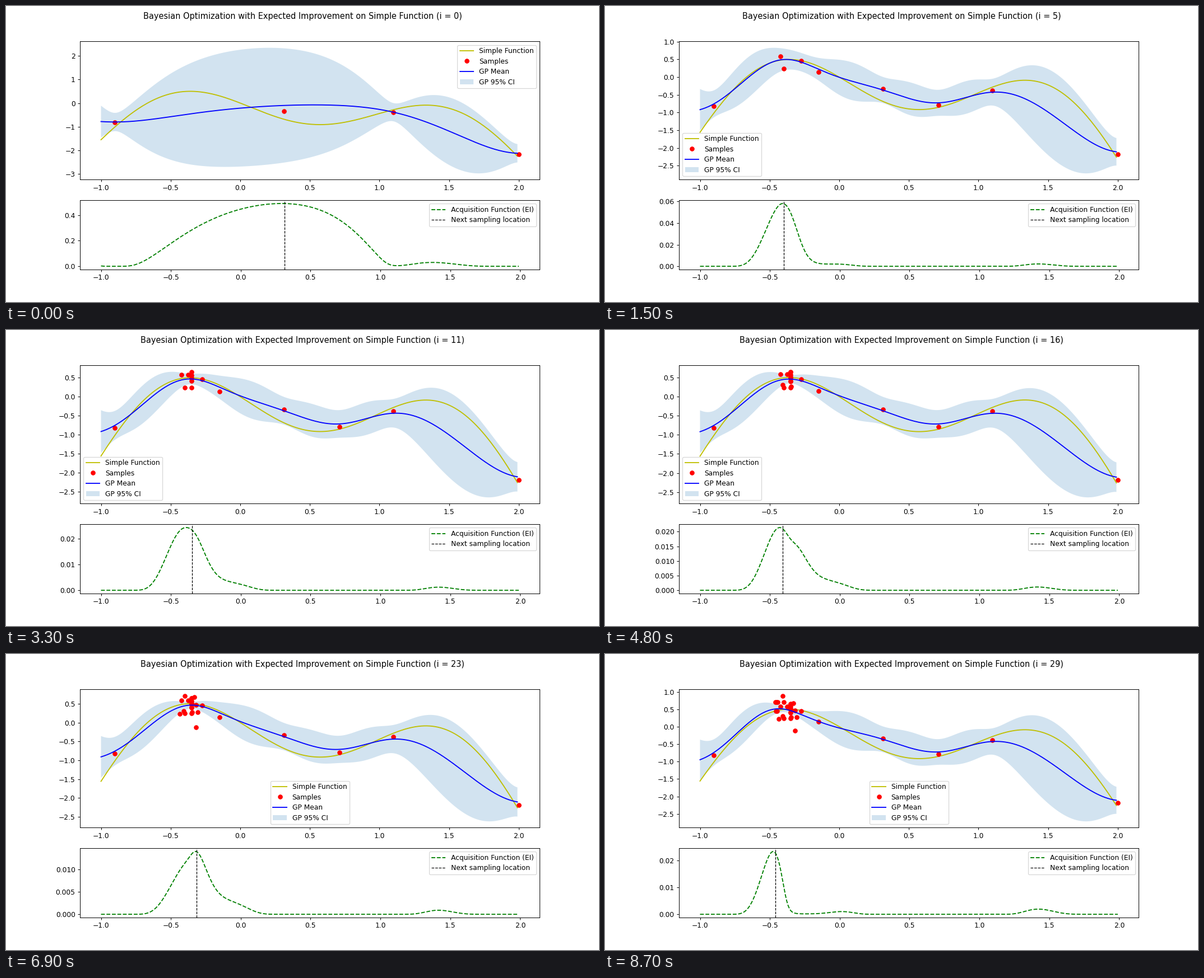
Write a matplotlib script that moves like this. It is 1058 px wide and 529 px high and loops after 9 s.

```python
import math

import matplotlib.pyplot as plt
import numpy as np
from matplotlib.animation import FuncAnimation

NOISE = 0.2
XI = 0.01
N_INIT = 3
N_STEPS = 30

x = np.arange(-1, 2, 0.01)
truth = -np.sin(3 * x) - x**2 + 0.7 * x
erf = np.vectorize(math.erf)


def run(x0, x1, ys):
    """Evenly spaced observations from x0 to x1."""
    return np.column_stack([np.linspace(x0, x1, len(ys)), ys])


def zigzag(y0, y1, n):
    """Noisy readings that alternate between two levels."""
    return np.resize([y0, y1], n)


def observations():
    """Three initial samples, a wide search, then a search around the peak."""
    initial = [(-0.9, -0.822), (1.1, -0.382), (2.0, -2.185)]
    explore = [(0.314, -0.334), (0.713, -0.787), (-0.149, 0.143), (-0.275, 0.455)]
    return np.vstack([
        initial,
        explore,
        run(-0.424, -0.351, zigzag(0.58, 0.24, 4)),
        run(-0.351, -0.349, np.linspace(0.65, 0.41, 4)),
        run(-0.351, -0.347, np.linspace(0.64, 0.27, 4)),
        [(-0.407, 0.305)],
        run(-0.330, -0.304, np.linspace(0.67, 0.27, 3)),
        run(-0.397, -0.433, zigzag(0.71, 0.23, 2)),
        [(-0.350, 0.50), (-0.317, -0.12), (-0.408, 0.885)],
        run(-0.443, -0.460, zigzag(0.70, 0.45, 5)),
    ])


def matern(a, b, length):
    """Matern 5/2 correlation."""
    r = math.sqrt(5) * np.abs(a[:, None] - b[None, :]) / length
    return (1 + r + r**2 / 3) * np.exp(-r)


def fit(xs, ys):
    """Maximise the marginal likelihood over length scale and variance."""
    log_len, log_var, span = 0.0, 0.0, 2.5
    steps = np.linspace(-1, 1, 15)
    for _ in range(6):
        lens = log_len + span * steps
        variances = log_var + span * steps
        corr = np.array([matern(xs, xs, math.exp(v)) for v in lens])
        w, q = np.linalg.eigh(corr)
        proj = np.einsum("lij,i->lj", q, ys) ** 2
        eig = np.exp(variances)[None, :, None] * w[:, None, :] + NOISE**2
        loss = (proj[:, None, :] / eig + np.log(eig)).sum(axis=2)
        a, b = np.unravel_index(loss.argmin(), loss.shape)
        log_len, log_var = lens[a], variances[b]
        span /= 5
    return math.exp(log_len), math.exp(log_var)


def make_predictor(xs, ys):
    length, var = fit(xs, ys)
    inv = np.linalg.inv(var * matern(xs, xs, length) + NOISE**2 * np.eye(len(xs)))

    def predict(points):
        k = var * matern(points, xs, length)
        spread = var - np.einsum("ij,jk,ik->i", k, inv, k)
        return k @ inv @ ys, np.sqrt(np.maximum(spread, 1e-12))

    return predict


def expected_improvement(mu, std, best):
    gain = mu - best - XI
    z = gain / std
    cdf = 0.5 * (1 + erf(z / math.sqrt(2)))
    pdf = np.exp(-z**2 / 2) / math.sqrt(2 * math.pi)
    return gain * cdf + std * pdf


def legend_place(i):
    if i < 7:
        return "best"
    return "lower left" if i < 20 else "lower center"


def add_legend(ax, loc):
    ax.legend(loc=loc, labelspacing=0.446, borderpad=0.37)


samples = observations()
fig, (top, bottom) = plt.subplots(
    2, 1, figsize=(12, 6), dpi=1058 / 12,
    gridspec_kw={"height_ratios": [2, 1]})
title = fig.suptitle("", fontsize=11.86)


def draw(i):
    known = samples[:N_INIT + i]
    shown = samples[:N_INIT + i + 1]
    predict = make_predictor(known[:, 0], known[:, 1])
    mu, std = predict(x)
    best = predict(shown[:, 0])[0].max()

    title.set_text("Bayesian Optimization with Expected Improvement "
                   f"on Simple Function (i = {i})")

    top.clear()
    top.plot(x, truth, "y-", label="Simple Function")
    top.plot(shown[:, 0], shown[:, 1], "ro", label="Samples")
    top.plot(x, mu, "b-", label="GP Mean")
    top.fill_between(x, mu + 1.96 * std, mu - 1.96 * std,
                     alpha=0.2, label="GP 95% CI")
    add_legend(top, legend_place(i))

    bottom.clear()
    bottom.plot(x, expected_improvement(mu, std, best), "g--",
                label="Acquisition Function (EI)")
    bottom.axvline(shown[-1, 0], ls="--", c="k", lw=1,
                   label="Next sampling location")
    add_legend(bottom, "upper right")
    return []


anim = FuncAnimation(fig, draw, frames=N_STEPS, init_func=lambda: [],
                     interval=300, repeat=True, repeat_delay=0)
plt.show()
```
